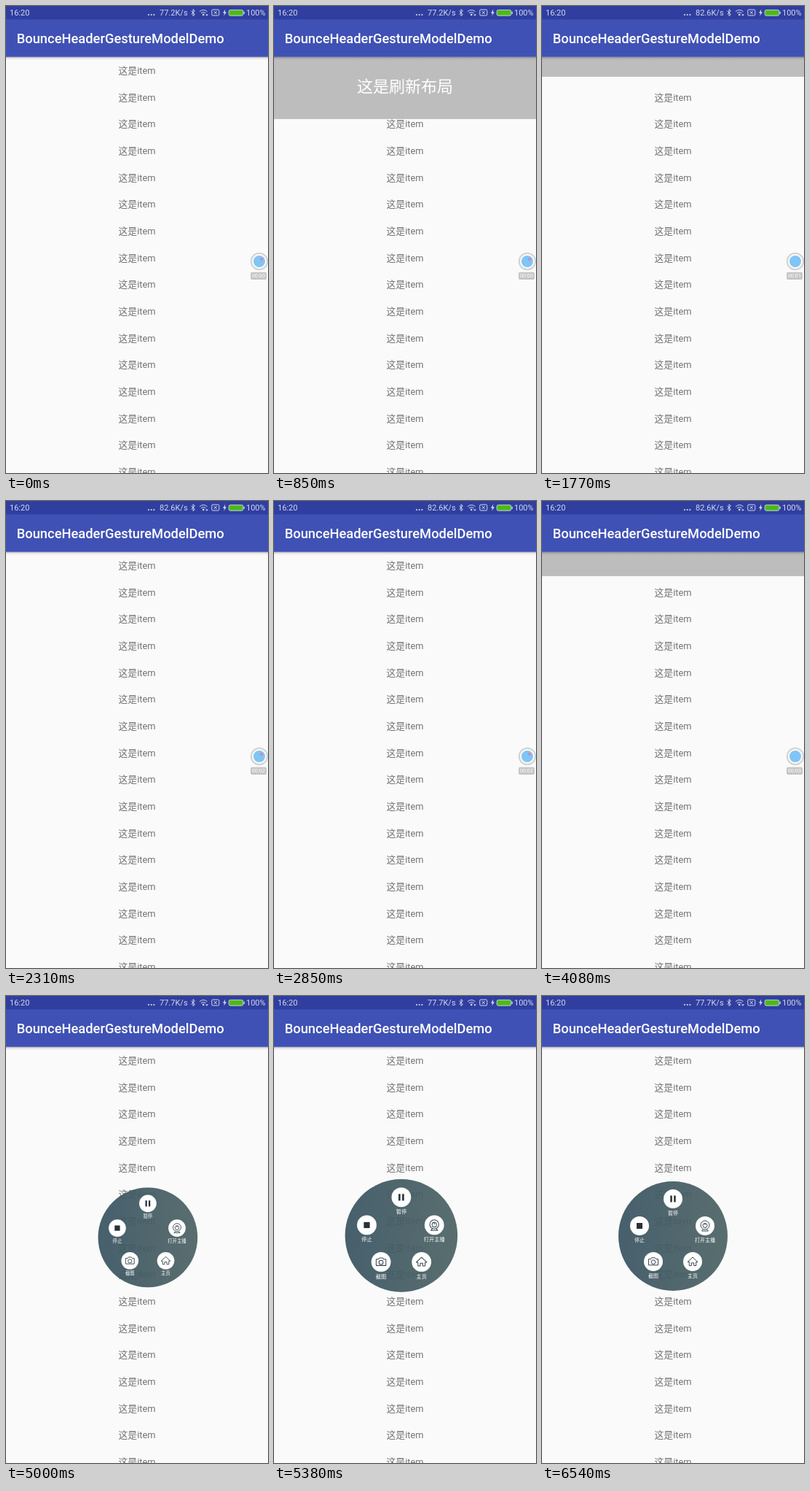
Recreate the animation shown at these times as an HTML page. Size 360x640 px, loop 6850 ms.

```html
<!DOCTYPE html>
<html lang="zh-CN">
<head>
<meta charset="utf-8">
<title>Pull to refresh</title>
<style>
  html, body { margin: 0; width: 100%; height: 100%; overflow: hidden; background: #fafafa; }
  svg { display: block; width: 360px; height: 640px; }
  text { font-family: Roboto, "Noto Sans CJK SC", "Noto Sans CJK", sans-serif; }
  .mid { text-anchor: middle; }
  .row { font-size: 12.83px; fill: #737373; }
  .status { font-size: 11px; fill: #d3d7ed; }
  .line { fill: none; stroke: #d3d7ed; stroke-width: 1; }
  .tool { fill: none; stroke: #37474f; stroke-width: 1; stroke-linejoin: round; }
  .tool .solid { fill: #263238; stroke: none; }
  .label { font-size: 7px; fill: #fff; }
</style>
</head>
<body>
<svg viewBox="0 0 360 640">
  <defs>
    <linearGradient id="shade" x2="0" y2="1">
      <stop offset="0" stop-opacity=".3"/>
      <stop offset=".4" stop-opacity=".1"/>
      <stop offset="1" stop-opacity="0"/>
    </linearGradient>
    <linearGradient id="dial">
      <stop offset="0" stop-color="#395462"/>
      <stop offset="1" stop-color="#4d6364"/>
    </linearGradient>
  </defs>
  <rect width="360" height="640" fill="#fafafa"/>
  <g id="rows"></g>

  <g id="panel">
    <rect y="-100" width="360" height="100" fill="#bdbdbd"/>
    <text class="mid" x="180" y="-37" font-size="22" fill="#fff">这是刷新布局</text>
  </g>

  <rect y="69.67" width="360" height="4.5" fill="url(#shade)"/>
  <rect width="360" height="69.67" fill="#3f51b5"/>
  <rect width="360" height="18.33" fill="#303f9f"/>
  <text x="14.67" y="51" font-size="18.33" font-weight="500" fill="#fff">BounceHeaderGestureModelDemo</text>

  <g class="status">
    <text x="5" y="13.3">16:20</text>
    <circle cx="196" cy="12" r="1.1"/><circle cx="199.7" cy="12" r="1.1"/><circle cx="203.4" cy="12" r="1.1"/>
    <text id="speed" x="211" y="13.3"></text>
    <path class="line" d="M254.5 6.7 259.5 11.5 257 13.6V4.6L259.5 6.8 254.5 11.5"/>
    <path class="line" d="M266 7.6Q271.2 3.2 276.5 7.6M268 9.7Q271.2 7 274.5 9.7" stroke-width="1.3"/>
    <circle cx="271.2" cy="11.9" r="1.3"/>
    <path d="M274 11.4h4l-2 2.4z"/>
    <rect class="line" x="282.8" y="5" width="10" height="8" rx="1.2"/>
    <path class="line" d="M285.8 7l4 4m0-4l-4 4"/>
    <path d="M301.3 4.5 298 9.8h2.2L299.2 13.8 303 8.3h-2.2z"/>
    <rect x="306.2" y="5.4" width="19.6" height="7.8" rx="2" fill="#4cbb17" stroke="#d3d7ed" stroke-width=".9"/>
    <rect x="326.5" y="7.6" width="1.3" height="3.4"/>
    <text x="330" y="13.3">100%</text>
  </g>

  <g id="button">
    <circle cx="348" cy="350" r="11.2" fill="#fafafa" stroke="#d2d2d2" stroke-width="2"/>
    <circle cx="348" cy="350" r="8" fill="#7fc5f6"/>
    <circle id="mark" cx="351" cy="347" r="2" fill="#d985a8"/>
    <rect x="336" y="364.7" width="22" height="10.2" rx="2" fill="#c6c6c6"/>
    <text id="timer" class="mid" x="347" y="372.3" font-size="7.2" fill="#fff"></text>
  </g>

  <g id="menu">
    <circle r="75" fill="url(#dial)" opacity=".93"/>
  </g>
</svg>
<script>
const LOOP = 6850, FPS = 13, LAST = 85;
const TOOLBAR_END = 69.67, PULL = 93.3;
const $ = id => document.getElementById(id);
const clamp = x => Math.min(1, Math.max(0, x));

for (let i = 0; i < 16; i++)
  $('rows').innerHTML += `<text class="row mid" x="180" y="${93 + i * 36.67}">这是item</text>`;

const tools = [
  [0, -51, '暂停', '<path class="solid" d="M-3.7-4.5h2.5v9h-2.5zM1.2-4.5h2.5v9H1.2z"/>'],
  [-46, -14, '停止', '<rect class="solid" x="-4" y="-4" width="8" height="8"/>'],
  [44, -14, '打开主播', '<circle cy="-1" r="6"/><circle cy="-.5" r="3"/><path d="M0-4V-1M-2.5 4.8-4.5 7h9L2.5 4.8"/>'],
  [-27, 35, '截图', '<path d="M-6.5-3.5h3l1.2-1.8h4.6l1.2 1.8h3v8.3h-13z"/><circle cy=".6" r="2.8"/>'],
  [27, 35, '主页', '<path d="M-7 .5 0-6 7 .5H4.7V5.5H1.7V1.8H-1.7V5.5H-4.7V.5z"/>']
];
for (const [x, y, label, icon] of tools)
  $('menu').innerHTML += `<g transform="translate(${x} ${y})"><circle r="13" fill="#fff"/>
    <g class="tool">${icon}</g><text class="label mid" y="21.5">${label}</text></g>`;

// Decelerating drag from start to end, then a smooth release.
function pull(t, start, end, release) {
  const drag = 1 - (1 - clamp((t - start) / (end - start))) ** 2;
  return PULL * drag * (1 + Math.cos(Math.PI * clamp((t - release) / 250))) / 2;
}

function overshoot(p) {
  const u = p - 1;
  return u * u * (3 * u + 2) + 1;
}

const show = (id, on) => $(id).setAttribute('visibility', on ? 'visible' : 'hidden');

function draw(now) {
  const frame = Math.min(LAST, Math.floor((now % LOOP + 5) * FPS / 1000));
  const t = Math.round(frame * 100 / FPS) * 10;

  const height = pull(t, 20, 1195, 1611) + pull(t, 2850, 3480, 3932);
  $('panel').setAttribute('transform', `translate(0 ${TOOLBAR_END + height})`);

  $('speed').textContent = (t < 1540 ? '77.2' : t < 4920 ? '82.6' : '77.7') + 'K/s';
  $('timer').textContent = '00:0' + [1080, 2080, 4000].filter(s => t >= s).length;
  show('button', t < 4770);
  show('mark', t < 1310 || t >= 2310 && t < 3690);

  const s = overshoot(clamp((t - 4820) / 650));
  show('menu', t >= 4920);
  $('menu').setAttribute('transform', `translate(${348 - 168 * s} ${350 - 21 * s}) scale(${s})`);
}

const began = performance.now();
function tick() {
  draw(performance.now() - began);
  requestAnimationFrame(tick);
}
tick();
</script>
</body>
</html>
```
